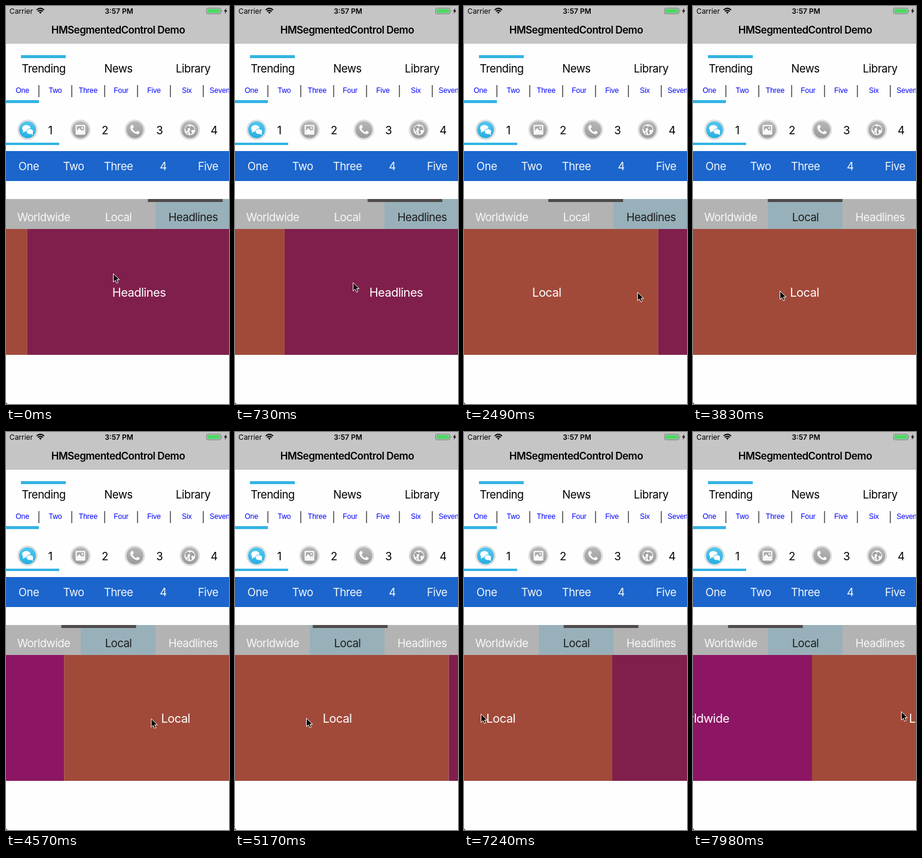
Animation, 373 px wide and 664 px high, one loop 8000 ms. Source, as an HTML page:

```html
<!DOCTYPE html>
<html lang="en">
<head>
<meta charset="utf-8">
<title>Segmented control demo</title>
<style>
  html, body { margin: 0; width: 100%; height: 100%; overflow: hidden; background: #fefefe; }
  svg { display: block; width: 373px; height: 664px; }
  text { font: 18.5px Inter, sans-serif; letter-spacing: -.5px; text-anchor: middle; }
  .status { font-size: 12px; letter-spacing: 0; }
  .title { font-size: 17px; font-weight: 600; }
  .small text { font: 12px "Liberation Sans", Arial, sans-serif; letter-spacing: 0; fill: #00f; }
  .light text { fill: #f4f6f8; }
  .page text { font-size: 20px; fill: #fff; }
  .accent { fill: #34b4e4; }
  #tabs text { fill: #f8f8f8; }
  #tabs text.on { fill: #1c1c1c; }
</style>
</head>
<body>
<svg viewBox="0 0 373 664">
  <defs>
    <linearGradient id="cyan" x2="0" y2="1"><stop stop-color="#55c8f0"/><stop offset="1" stop-color="#23ade0"/></linearGradient>
    <linearGradient id="gray" x2="0" y2="1"><stop stop-color="#b9b9b9"/><stop offset="1" stop-color="#999"/></linearGradient>
  </defs>

  <rect width="373" height="63" fill="#c5c5c5"/>
  <text class="status" x="25.5" y="12.5">Carrier</text>
  <g fill="none" stroke="#000" stroke-width="1.9">
    <path d="M51.2 6.6Q57.5 1 63.8 6.6M53.4 9Q57.5 5.4 61.6 9"/>
    <path d="M55.3 10.6Q57.5 8.6 59.7 10.6L57.5 13Z" fill="#000" stroke="none"/>
  </g>
  <text class="status" x="189" y="12.5" font-weight="600" style="font-weight:600">3:57 PM</text>
  <rect x="335.5" y="3.5" width="24" height="9.5" rx="2" fill="none" stroke="#777"/>
  <rect x="337" y="5" width="21" height="6.5" rx="1" fill="#4cd964"/>
  <path d="M361 6.5q1.6 1.7 0 3.5z" fill="#777"/>
  <path d="M368.6 3.5l-4 5.2h2.5l-1.2 4.3 4.2-5.6h-2.6z"/>
  <text class="title" x="187.5" y="46">HMSegmentedControl Demo</text>

  <rect class="accent" x="25" y="82" width="75" height="5"/>
  <g id="topics"></g>

  <g id="days" class="small"></g>
  <path d="M55 132v20m55-20v20m55-20v20m55-20v20m55-20v20m55-20v20" stroke="#444" stroke-width="1.5"/>
  <rect class="accent" y="157" width="55" height="5"/>

  <g id="badges"></g>
  <g fill="#fff">
    <g transform="translate(36 206.500)">
      <ellipse cx="-2" cy="-2.500" rx="7" ry="5.500"/><path d="M-7 0l-1 5 5-3z"/>
      <g stroke="#35b8e8"><ellipse cx="4" cy="3" rx="5.800" ry="4.600"/></g>
      <path d="M5 6l4 3-.5-5z"/>
    </g>
    <g transform="translate(124.500 206.500)">
      <path d="M-8-8H8V8H-8Z"/><path d="M-6-6H6V5H-6Z" fill="#a8a8a8"/>
      <path d="M-6 5V2l4-5 4 5 2-2 2 2v3z"/><circle cx="3" cy="-3" r="1.500"/>
    </g>
    <path transform="translate(215.500 206.500)" d="M-5-8C-9-6-8-1-4 3S6 9 8 5C9 4 5 1 4 2L2 4C0 3-3 0-4-2L-2-4C-1-5-4-9-5-8Z"/>
    <g transform="translate(307.500 206.500)">
      <circle r="9"/>
      <path d="M-8-3l4-4 4 1-1 3-3 1 1 3-3 2zM2-7l5 3 1 5-4-1-2 2 2 3-3 3-2-5 2-4-2-2zM-5 3l3 2-1 3z" fill="#a2a2a2"/>
    </g>
  </g>
  <rect class="accent" y="228" width="89" height="4"/>

  <rect y="242" width="373" height="50" fill="#1b65cd"/>
  <g id="numbers" class="light"></g>

  <rect y="322" width="373" height="50" fill="#b3b3b3"/>
  <rect id="chosen" y="322" width="125" height="50" fill="#98b0b9"/>
  <g id="tabs"></g>
  <rect id="marker" y="322" width="125" height="5" fill="#504b4b"/>
  <g id="pages" class="page"></g>

  <path d="M0 661l2.500 3H0Z" fill="#46685f"/>
  <path id="cursor" d="M.5.5V14.500L3.800 11.500 6 16.500 8.500 15.400 6.300 10.600H10.700Z" stroke="#fff"/>
</svg>
<script>
const $ = id => document.getElementById(id);
const label = (s, x, y) => `<text x="${x}" y="${y}">${s}</text>`;
const row = (id, words, x, gap, y) =>
  $(id).innerHTML = words.map((s, i) => label(s, x + i * gap, y)).join('');

const places = ['Worldwide', 'Local', 'Headlines'];
row('topics', ['Trending', 'News', 'Library'], 63, 125, 111);
row('days', ['One', 'Two', 'Three', 'Four', 'Five', 'Six', 'Seven'], 27.5, 55, 144.5);
row('numbers', ['One', 'Two', 'Three', '4', 'Five'], 38, 75, 274);
row('tabs', places, 63, 125, 359);

$('badges').innerHTML = [36, 124.5, 215.5, 307.5].map((x, i) =>
  `<circle cx="${x}" cy="206.500" r="15.500" fill="url(#${i ? 'gray' : 'cyan'})" stroke="#dedede" stroke-width="3"/>`
  + label(i + 1, 74 + 91.3 * i, 214)).join('');

const colors = ['#8c1663', '#a24a3a', '#801f4c'];
$('pages').innerHTML = places.map((s, i) =>
  `<rect x="${(i - 1) * 373}" y="372" width="373" height="210" fill="${colors[i]}"/>`
  + label(s, (i - 0.5) * 373, 484.5)).join('');

// Each key: step, scroll offset, pointer x, pointer y.
const LOOP = 8000, STEP = 148;
const keys = [
  [0, -337, 179, 446], [3, -245, 271, 452], [8, -373, 61, 472], [9, -373, 61, 472],
  [10, -278.5, 156, 473], [14, -110, 322, 478], [18, -12, 235, 476], [22, 0, 141, 475],
  [25, 0, 141, 475], [26, 0, 145, 475], [30, 106, 253, 478], [35, -15.5, 119, 477],
  [37.5, -75, 75, 480], [41, 100.5, 260, 484], [42.5, 150, 305, 481],
  [49, -125, 28, 470], [54, 199, 348, 466]
];

const slope = (i, c) => (keys[i + 1][c] - keys[i][c]) / (keys[i + 1][0] - keys[i][0]);

// Zero at turning points, so the curve never overshoots a key.
function tangent(i, c) {
  if (i === 0) return slope(0, c);
  if (i === keys.length - 1) return slope(i - 1, c);
  const a = slope(i - 1, c), b = slope(i, c);
  return a * b > 0 ? 2 * a * b / (a + b) : 0;
}

function track(k, c) {
  let i = 0;
  while (i < keys.length - 2 && k >= keys[i + 1][0]) i++;
  const p = keys[i], q = keys[i + 1], w = q[0] - p[0];
  const u = Math.min(1, (k - p[0]) / w), v = 1 - u;
  return p[c] * v * v * (1 + 2 * u) + q[c] * u * u * (3 - 2 * u)
    + w * u * v * (tangent(i, c) * v - tangent(i + 1, c) * u);
}

function draw(time) {
  const k = Math.floor((time % LOOP + 20) / STEP);
  const scroll = track(k, 1);
  const selected = k < 20 ? 2 : 1;
  $('pages').setAttribute('transform', `translate(${scroll})`);
  $('marker').setAttribute('x', 125 - scroll / 3);
  $('chosen').setAttribute('x', selected * 125);
  [...$('tabs').children].forEach((t, i) => t.classList.toggle('on', i === selected));
  $('cursor').setAttribute('transform', `translate(${track(k, 2)} ${track(k, 3)})`);
}

const start = performance.now();
function tick() {
  draw(performance.now() - start);
  requestAnimationFrame(tick);
}
tick();
</script>
</body>
</html>
```
